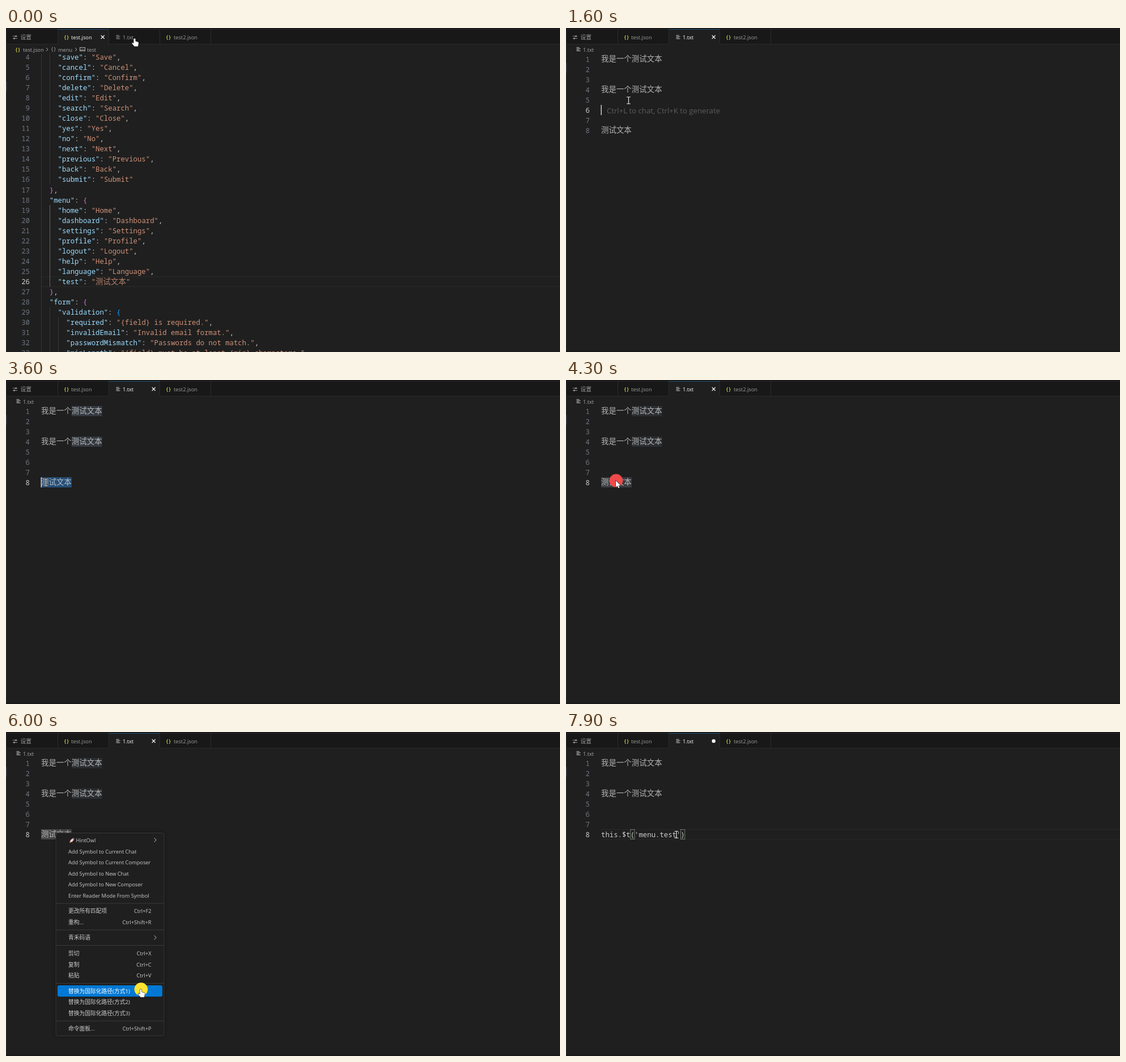
Write an HTML page with a canvas that moves like this. It is 978 px wide and 573 px high and loops after 8 s.

```html
<!DOCTYPE html>
<html lang="zh">
<head>
<meta charset="utf-8">
<style>
html, body { margin: 0; width: 100%; height: 100%; overflow: hidden; background: #1f1f1f; }
canvas { display: block; }
</style>
</head>
<body>
<canvas id="stage" width="978" height="573"></canvas>
<script>
const c = document.getElementById('stage').getContext('2d');
const CJK = "'Noto Sans CJK SC', 'Noto Sans CJK', sans-serif";
const UI = `'Open Sans', 'Noto Sans', ${CJK}`;
const MONO = "'Noto Sans Mono', 'DejaVu Sans Mono', monospace";
const CODE = `500 12.32px ${MONO}`;
const CH = 7.392, WIDE = 13.45, LEFT = 62;
const YELLOW = '#fde32f', RED = '#f14a4a';

const jsonLines = `    "save": "Save",
    "cancel": "Cancel",
    "confirm": "Confirm",
    "delete": "Delete",
    "edit": "Edit",
    "search": "Search",
    "close": "Close",
    "yes": "Yes",
    "no": "No",
    "next": "Next",
    "previous": "Previous",
    "back": "Back",
    "submit": "Submit"
  },
  "menu": {
    "home": "Home",
    "dashboard": "Dashboard",
    "settings": "Settings",
    "profile": "Profile",
    "logout": "Logout",
    "help": "Help",
    "language": "Language",
    "test": "测试文本"
  },
  "form": {
    "validation": {
      "required": "{field} is required.",
      "invalidEmail": "Invalid email format.",
      "passwordMismatch": "Passwords do not match.",
      "minLength": "{field} must be at least {min} characters.",`.split('\n');

// label, centre y, shortcut ('>' opens a submenu)
const menuItems = [
  ['HintOwl', 191, '>'],
  ['Add Symbol to Current Chat', 211],
  ['Add Symbol to Current Composer', 230.5],
  ['Add Symbol to New Chat', 250],
  ['Add Symbol to New Composer', 269.5],
  ['Enter Reader Mode From Symbol', 289],
  ['更改所有匹配项', 316.5, 'Ctrl+F2'],
  ['重构...', 336, 'Ctrl+Shift+R'],
  ['青禾码语', 363.5, '>'],
  ['剪切', 391, 'Ctrl+X'],
  ['复制', 411, 'Ctrl+C'],
  ['粘贴', 430.3, 'Ctrl+V'],
  ['替换为国际化路径(方式1)', 458],
  ['替换为国际化路径(方式2)', 477.5],
  ['替换为国际化路径(方式3)', 497],
  ['命令面板...', 524.5, 'Ctrl+Shift+P']
];

// time, x, y of the pointer
const path = [
  [0, 227, 18.5], [1000, 227, 18.5], [1200, 290, 60], [1600, 110.5, 128],
  [1800, 113, 168], [2300, 117, 181], [2750, 117, 181], [2800, 93, 181],
  [3100, 61.5, 181], [3400, 61.5, 181], [3700, 75, 181], [4000, 88, 178],
  [4500, 88, 178], [5100, 226, 348.5], [5400, 234, 431], [5800, 238, 455],
  [6600, 238, 455], [6900, 203, 222], [7100, 203, 222], [7400, 200, 205],
  [7800, 195, 181.5], [8000, 195, 181.5]
];

// from, to, colour of the click marker
const clicks = [
  [100, 500, YELLOW], [2300, 3300, YELLOW], [4100, 4400, RED],
  [5950, 6150, YELLOW], [6800, 7100, YELLOW]
];

function pointerAt(t) {
  const i = path.findIndex(p => p[0] > t), a = path[i - 1], b = path[i];
  const k = (t - a[0]) / (b[0] - a[0]);
  return [a[1] + (b[1] - a[1]) * k, a[2] + (b[2] - a[2]) * k];
}

function rect(x, y, w, h, color) {
  c.fillStyle = color;
  c.fillRect(x, y, w, h);
}

function box(x, y, w, h, r, color) {
  c.fillStyle = color;
  c.beginPath();
  c.roundRect(x, y, w, h, r);
  c.fill();
}

function dot(x, y, r, color) {
  c.fillStyle = color;
  c.beginPath();
  c.arc(x, y, r, 0, 7);
  c.fill();
}

function stroke(d, color, width = 1) {
  c.strokeStyle = color;
  c.lineWidth = width;
  c.stroke(new Path2D(d));
}

function text(s, x, y, color, font, align = 'left') {
  c.font = font;
  c.fillStyle = color;
  c.textAlign = align;
  c.fillText(s, x, y);
}

function label(s, x, y, color, align) {
  const size = /[\u4e00-\u9fff]/.test(s) ? 9.75 : 9.25;
  text(s, x, y + 3.5, color, `${size}px ${UI}`, align);
}

// Editor text; returns the x where it ends
function code(s, x, y, color) {
  for (const run of s.match(/[\u4e00-\u9fff]+|[^\u4e00-\u9fff]+/g)) {
    const wide = run > '\u4e00';
    if (wide) {
      c.globalAlpha = 0.85;
      [...run].forEach((g, i) => text(g, x + i * WIDE, y + 4.5, color, `300 13.4px ${CJK}`));
      c.globalAlpha = 1;
    } else text(run, x, y + 4.5, color, CODE);
    x += run.length * (wide ? WIDE : CH);
  }
  return x;
}

function lineNumber(n, y, active) {
  text(n, 42, y + 4.5, active ? '#d0d0d0' : '#6e7681', CODE, 'right');
}

const braces = (x, y) => text('{}', x, y + 3, '#cbcb41', `bold 8px ${MONO}`);
const chevron = (x, y, s, color) => stroke(`M${x} ${y - s}l${s} ${s}l${-s} ${s}`, color);
const fileIcon = (x, y, color) =>
  stroke(`M${x} ${y - 3}h5M${x} ${y - 1}h7M${x} ${y + 1}h5M${x} ${y + 3}h7`, color, 0.9);

function lineFrame(y) {
  rect(LEFT, y - 9, 916, 1, '#2a2a2a');
  rect(LEFT, y + 8.5, 916, 1, '#2a2a2a');
}

function drawTabs(inJson, dirty) {
  const active = inJson ? 92 : 182, dim = '#9d9d9d', lit = '#ffffff';
  rect(0, 0, 978, 28, '#181818');
  rect(0, 2, 978, 1, '#262626');
  rect(0, 28, 978, 1, '#2b2b2b');
  for (const x of [91, 181, 271, 361]) rect(x, 3, 1, 25, '#2b2b2b');
  rect(active, 3, 89, 26, '#1f1f1f');
  rect(active - 1, 2, 91, 1, '#24507c');

  stroke('M12 14.5h8M12 18.5h8', '#9d9d9d', 0.9);
  dot(17.5, 14.5, 1.4, '#9d9d9d');
  dot(14.5, 18.5, 1.4, '#9d9d9d');
  label('设置', 25.5, 16.5, dim);
  braces(102, 16);
  label('test.json', 115, 16.5, inJson ? lit : dim);
  fileIcon(194.5, 16, inJson ? dim : '#cccccc');
  label('1.txt', 206, 16.5, inJson ? dim : lit);
  braces(282, 16);
  label('test2.json', 296, 16.5, dim);
  const x = active + 78.7;
  if (dirty) dot(x, 16, 3.2, '#ffffff');
  else stroke(`M${x - 3} 13l6 6m0 -6l-6 6`, '#ffffff', 1.1);

  if (inJson) {
    braces(16, 37.5);
    label('test.json', 30, 38, '#a9a9a9');
    chevron(71, 38, 3, '#a9a9a9');
    text('{}', 79, 41, '#b0b0b0', `8px ${MONO}`);
    label('menu', 92, 38, '#a9a9a9');
    chevron(122, 38, 3, '#a9a9a9');
    c.strokeStyle = '#b0b0b0';
    c.strokeRect(130.5, 34.5, 9, 6);
    text('abc', 135, 39.5, '#b0b0b0', `5px ${UI}`, 'center');
    label('test', 143, 38, '#a9a9a9');
  } else {
    fileIcon(18.5, 37.5, '#cccccc');
    label('1.txt', 30, 38, '#a9a9a9');
  }
}

function drawJson() {
  c.save();
  c.beginPath();
  c.rect(0, 46, 978, 527);
  c.clip();
  const rowY = n => 51.5 + (n - 4) * 18.04;
  const guide = (x, from, to, color) =>
    rect(x, rowY(from) - 9, 1, (to - from + 1) * 18.04, color);
  lineFrame(rowY(26));
  guide(62, 4, 33, '#373737');
  guide(77, 4, 16, '#373737');
  guide(77, 19, 26, '#656565');
  guide(77, 29, 33, '#373737');
  guide(92, 30, 33, '#373737');
  jsonLines.forEach((line, i) => {
    const n = i + 4, y = rowY(n), indent = line.search(/\S/);
    lineNumber(n, y, n === 26);
    let x = LEFT + indent * CH;
    for (const part of line.slice(indent).match(/"[^"]*"(?=:)|"[^"]*"|[{}]|[^"{}]+/g)) {
      const isKey = part[0] === '"' && line.includes(part + ':');
      const color = isKey ? '#9cdcfe' : part[0] === '"' ? '#ce9178'
        : !/[{}]/.test(part) ? '#cccccc' : n === 29 ? '#179fff' : '#da70d6';
      x = code(part, x, y, color);
    }
  });
  c.restore();
}

function drawText(t, pointerX) {
  const rowY = n => 37 + n * 18;
  const blinkOn = since => Math.floor((t - since) / 500) % 2 === 0;
  const caret = (x, n) => rect(x - 0.5, rowY(n) - 9, 1.5, 18, '#cccccc');
  const replaced = t >= 6200, lastRow = t >= 2300;

  if (replaced) {
    if (t < 6900) rect(LEFT, rowY(8) - 9, 20 * CH, 18, '#264f78');
    else {
      lineFrame(rowY(8));
      for (const col of [7, 19]) {
        rect(LEFT + col * CH, rowY(8) - 8.5, CH, 17, 'rgba(0,100,0,.1)');
        c.strokeStyle = '#888888';
        c.lineWidth = 0.8;
        c.strokeRect(LEFT + col * CH, rowY(8) - 8.5, CH, 17);
      }
    }
  } else if (lastRow) {
    const start = t < 3400 ? Math.max(0, Math.min(4, Math.round((pointerX - LEFT) / WIDE))) : 0;
    const width = (4 - start) * WIDE, x = LEFT + start * WIDE;
    const match = `rgba(173,214,255,${t < 4200 ? 0.15 : 0.08})`;
    for (const n of [1, 4]) rect(x + 4 * WIDE, rowY(n) - 9, width, 18, match);
    rect(x, rowY(8) - 9, width, 18, t < 4200 ? '#264f78' : t < 4400 ? '#3a3d41' : '#474747');
    if (t < 3200 || t < 4200 && blinkOn(3200)) caret(x, 8);
  }

  for (let n = 1; n < 9; n++) lineNumber(n, rowY(n), n === (lastRow ? 8 : 6));
  for (const n of [1, 4]) code('我是一个测试文本', LEFT, rowY(n) - 0.5, '#cccccc');
  if (replaced) code("this.$t('menu.test')", LEFT, rowY(8), '#cccccc');
  else code('测试文本', LEFT, rowY(8) - 0.5, '#cccccc');

  if (!lastRow && t >= 400) {
    text('Ctrl+L to chat, Ctrl+K to generate', 72, 151, '#5c5c5c', `13.2px ${UI}`);
    if (blinkOn(200)) caret(LEFT, 6);
  }
  if (replaced && t < 6900 && blinkOn(6100)) caret(LEFT, 8);
  if (t >= 6900 && blinkOn(6950)) caret(LEFT + 20 * CH, 8);
}

function rocket(x, y) {
  c.save();
  c.translate(x, y);
  c.rotate(Math.PI / 4);
  rect(-2.6, 0.5, 5.2, 2.5, '#d8344a');
  c.fillStyle = '#d5dde3';
  c.beginPath();
  c.ellipse(0, -0.5, 1.8, 4.5, 0, 0, 7);
  c.fill();
  dot(0, -3.6, 1.2, '#d8344a');
  dot(0, 4.6, 1.1, '#f5a623');
  c.restore();
}

function drawMenu(pointerY) {
  c.save();
  c.shadowColor = 'rgba(0,0,0,.4)';
  c.shadowBlur = 7;
  box(88, 178.5, 191, 359, 4, '#1f1f1f');
  c.restore();
  c.strokeStyle = '#3c3c3c';
  c.lineWidth = 0.9;
  c.stroke();
  for (const y of [302.5, 349.5, 377, 444, 510.5]) rect(88, y, 191, 1, '#3a3a3a');

  const gap = item => Math.abs(item[1] - pointerY);
  const hovered = pointerY > 181 && menuItems.reduce((a, b) => gap(b) < gap(a) ? b : a);
  for (const item of menuItems) {
    const [name, y, keys] = item, color = item === hovered ? '#ffffff' : '#cccccc';
    if (item === hovered) box(91, y - 10, 185, 20, 3, '#0078d4');
    label(name, y === 191 ? 123.5 : 110, y, color);
    if (keys === '>') chevron(261.5, y, 3.7, color);
    else if (keys) label(keys, 256.5, y, color, 'right');
  }
  rocket(116.5, 191.5);
}

const shapes = {
  hand: 'M-1.5 1Q0 -.8 1.5 1V5L6 6.2Q7.2 6.6 7 8L6 14H-.3L-4.5 8.9Q-4.8 7.2 -3.2 7.4L-1.5 9Z',
  arrow: 'M0 0V11.5L2.7 9L4.6 13.2L6.4 12.4L4.6 8.4H8.4Z',
  beam: 'M-3.5 -6H-1Q0 -6 0 -5Q0 -6 1 -6H3.5M0 -5V5M-3.5 6H-1Q0 6 0 5Q0 6 1 6H3.5'
};

function drawPointer(kind, x, y) {
  c.save();
  c.translate(x, y);
  if (kind === 'beam') {
    stroke(shapes.beam, '#111111', 2.4);
    stroke(shapes.beam, '#f0f0f0', 1.2);
  } else {
    stroke(shapes[kind], '#1a1a1a', 1.2);
    c.fillStyle = '#ffffff';
    c.fill(new Path2D(shapes[kind]));
  }
  c.restore();
}

function draw(t) {
  const [x, y] = pointerAt(t);
  const inJson = t < 300, menuOpen = t >= 4400 && t < 6100;
  rect(0, 0, 978, 573, '#1f1f1f');
  if (inJson) drawJson();
  else drawText(t, x);
  drawTabs(inJson, t >= 6200);
  rect(0, 3, 1, 570, '#2b2b2b');
  rect(0, inJson ? 95 : 62, 1.5, 17, '#3b3f48');
  if (!inJson) rect(0, 571, 978, 2, '#191919');
  if (menuOpen) drawMenu(y);

  const kind = y < 30 || menuOpen && y > 181 ? 'hand' : t >= 4100 && t < 6100 ? 'arrow' : 'beam';
  const click = clicks.find(k => t >= k[0] && t < k[1]);
  const dragging = t >= 2300 && t < 2900;
  if (dragging) drawPointer(kind, x, y);
  if (click) dot(dragging ? 117.5 : x + 0.4, y, 11.8, click[2]);
  if (!dragging) drawPointer(kind, x, y);
}

function tick() {
  draw(Math.floor(performance.now() % 8000 / 100) * 100);
  requestAnimationFrame(tick);
}
tick();
</script>
</body>
</html>
```
